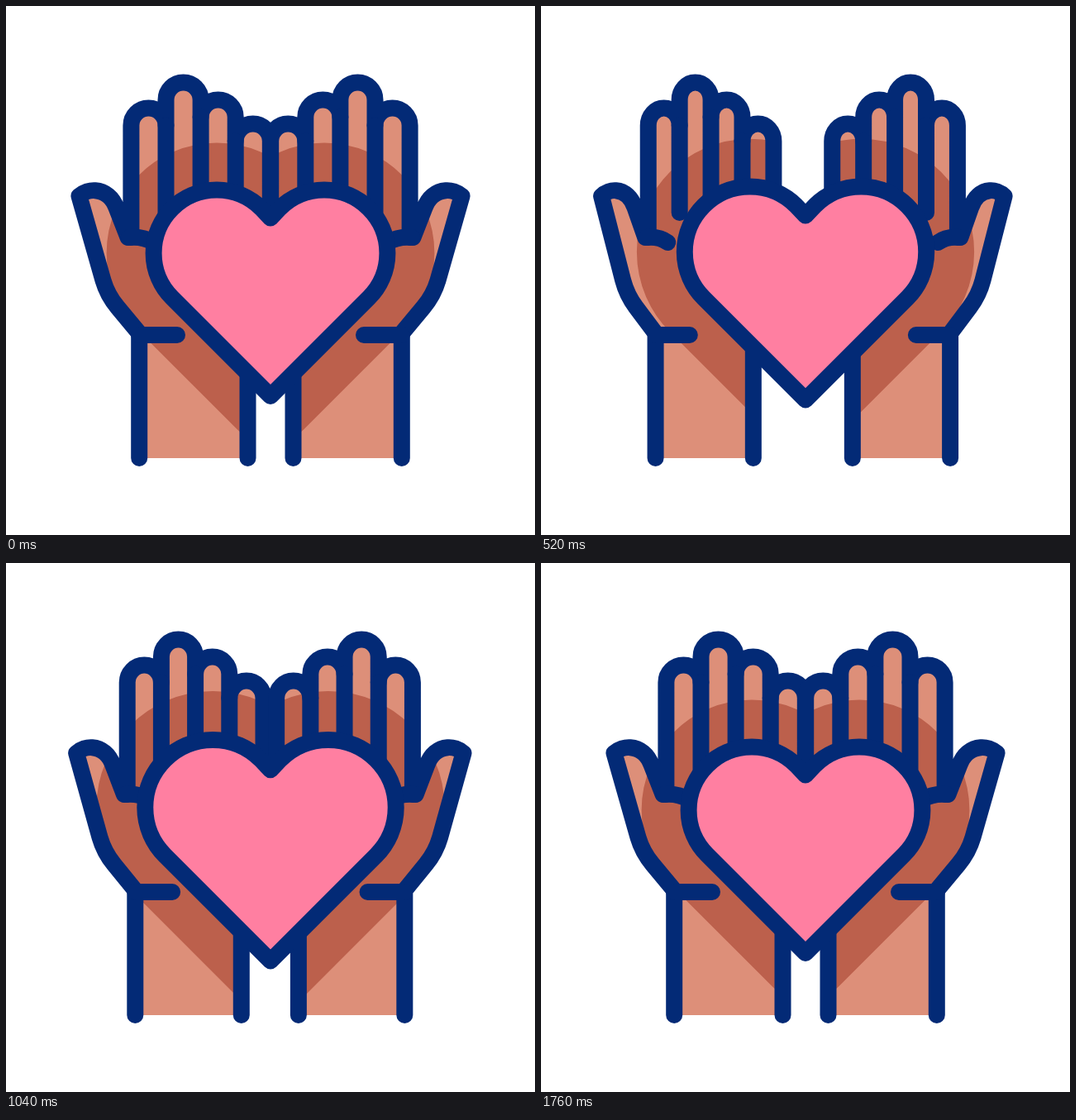
These frames come from a looping animation (640 px wide and 640 px high, 1880 ms). An HTML page with a canvas:

```html
<!DOCTYPE html>
<html lang="en">
<head>
<meta charset="utf-8">
<title>Hands and heart</title>
<style>
  html, body { margin: 0; width: 100%; height: 100%; overflow: hidden; background: #fff; }
  canvas { display: block; width: 100vw; height: 100vh; object-fit: contain; }
</style>
</head>
<body>
<canvas id="stage" width="640" height="640"></canvas>
<script>
const ctx = document.getElementById('stage').getContext('2d');
const SIZE = 640, LOOP = 1880, STEP = 40;
const NAVY = '#032a76', SKIN = '#dd8f79', SHADE = '#bc604c', PINK = '#ff7fa1';
const LINE = 20;

// Fingers from index to little finger
const FINGER_X = 151.4, FINGER_W = 42.1;
const FINGER_TOPS = [123.5, 92.5, 113.5, 142.5];

const clamp = v => Math.min(1, Math.max(0, v));
const cubic = u => u < .5 ? 4 * u ** 3 : 1 - 4 * (1 - u) ** 3;

// Hands part until 640 ms, then come back the same way
const spread = t => cubic(clamp(1 - Math.abs(t - 640) / 640));

// Two heartbeats of 570 ms, starting at 40 ms
const beat = t => (1 - Math.cos(2 * Math.PI * clamp((t - 40) / 1140) * 2)) / 2;

function handOutline() {
  const p = new Path2D();
  p.moveTo(161.2, 547);
  p.lineTo(161.2, 396);
  p.lineTo(135, 364.5);
  p.bezierCurveTo(127, 355, 121, 344, 117.5, 332);
  p.lineTo(88.5, 230);
  p.bezierCurveTo(94, 225, 102, 222.7, 108, 223.2);
  p.bezierCurveTo(120, 224, 129, 232, 133.5, 244);
  p.lineTo(147.5, 280);
  p.lineTo(FINGER_X, 280);
  const r = FINGER_W / 2;
  FINGER_TOPS.forEach((top, i) =>
    p.arc(FINGER_X + FINGER_W * i + r, top + r, r, Math.PI, 0));
  p.lineTo(319.8, 300);
  p.lineTo(292.5, 400);
  p.lineTo(292.5, 547);
  return p;
}

function handCreases() {
  const p = new Path2D();
  for (let i = 1; i < 4; i++) {
    const x = FINGER_X + FINGER_W * i;
    p.moveTo(x, Math.max(FINGER_TOPS[i - 1], FINGER_TOPS[i]) + FINGER_W / 2);
    p.lineTo(x, 250);
  }
  p.moveTo(149, 280);
  p.bezierCurveTo(161, 279, 170, 281, 177.5, 286);
  p.moveTo(161.2, 398);
  p.lineTo(207, 398);
  return p;
}

// Two circles joined by 45 degree tangents
function heartOutline() {
  const p = new Path2D(), r = 76.4, q = Math.PI / 4;
  p.moveTo(320, 472);
  p.arc(255, 299, r, 3 * q, 7 * q);
  p.lineTo(320, 256.5);
  p.arc(385, 299, r, 5 * q, 9 * q);
  p.closePath();
  return p;
}

const OUTLINE = handOutline(), CREASES = handCreases(), HEART = heartOutline();

// Transforms the shape but leaves the line width alone
function moved(path, sx, sy, dx, dy) {
  const p = new Path2D();
  p.addPath(path, new DOMMatrix([sx, 0, 0, sy, dx, dy]));
  return p;
}

function stroke(path, color, width) {
  ctx.strokeStyle = color;
  ctx.lineWidth = width;
  ctx.stroke(path);
}

function fill(path, color) {
  ctx.fillStyle = color;
  ctx.fill(path);
}

function drawHand(sx, dx, heart, reach) {
  const outline = moved(OUTLINE, sx, 1, dx, 0);
  fill(outline, SKIN);
  ctx.save();
  ctx.clip(outline);
  fill(heart, SHADE);
  stroke(heart, SHADE, 2 * reach);
  ctx.restore();
  stroke(outline, NAVY, LINE);
  stroke(moved(CREASES, sx, 1, dx, 0), NAVY, LINE);
}

function draw(t) {
  const p = spread(t), h = beat(t);
  const k = 1 + .15 * h, w = 1 - .102 * p;
  const heart = moved(HEART, k, k, 320 * (1 - k), 342 * (1 - k));

  ctx.fillStyle = '#fff';
  ctx.fillRect(0, 0, SIZE, SIZE);
  ctx.lineCap = ctx.lineJoin = 'round';

  drawHand(w, -6.8 * p, heart, 57 + 4 * h);
  drawHand(-w, SIZE + .3 * p, heart, 57 + 4 * h);
  fill(heart, PINK);
  stroke(heart, NAVY, LINE);
}

const start = performance.now();
function tick() {
  const t = (performance.now() - start) % LOOP;
  draw(Math.floor(t / STEP) * STEP);
  requestAnimationFrame(tick);
}
tick();
</script>
</body>
</html>
```
